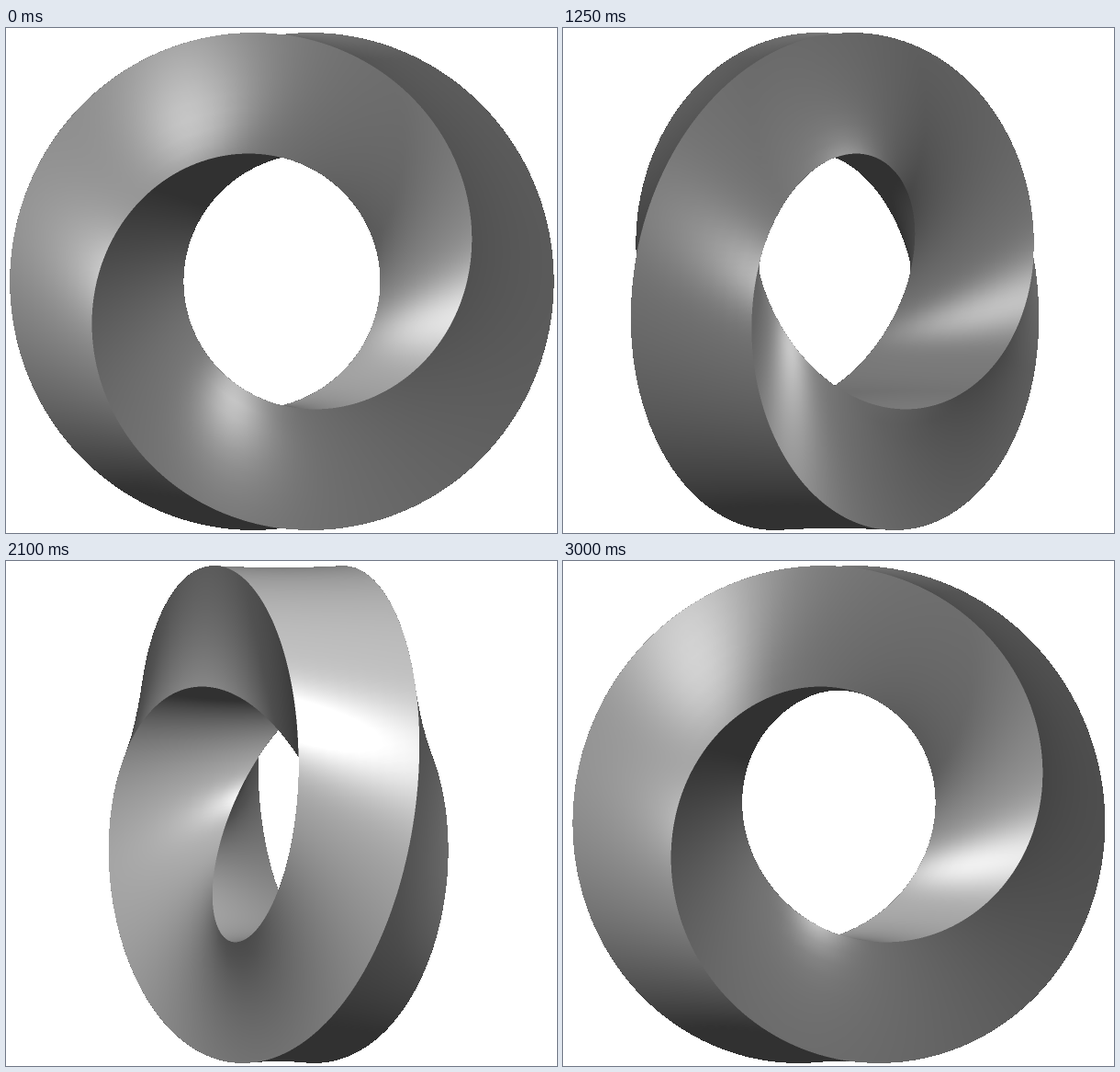
An HTML page with a canvas for the animation above (3050 ms loop, 600 by 549 pixels).

```html
<!DOCTYPE html>
<html lang="en">
<head>
<meta charset="utf-8">
<title>Twisted square ring</title>
<style>
  html, body { margin: 0; width: 100%; height: 100%; overflow: hidden; background: #fff; }
  canvas { display: block; width: 600px; height: 549px; }
</style>
</head>
<body>
<canvas id="stage" width="600" height="549"></canvas>
<script>
const W = 600, H = 549, SS = 2, BW = W * SS, BH = H * SS;
const STEP = 50, COUNT = 61;
const RING = 201.6, HALF = 67.1;          // ring radius, half side of the square section
const AROUND = 180, ACROSS = 8;
const AMBIENT = 49, DIFFUSE = 74, GLOSS = 74, SHININESS = 14;
const RAD = Math.PI / 180;

const ctx = document.getElementById('stage').getContext('2d');
const image = ctx.createImageData(W, H);
const pixels = new Uint32Array(image.data.buffer);
const depth = new Float32Array(BW * BH);
const shade = new Float32Array(BW * BH);

function lightAt(azimuth) {
  const flat = Math.cos(27 * RAD);
  return [flat * Math.cos(azimuth * RAD), Math.sin(27 * RAD), flat * Math.sin(azimuth * RAD)];
}
const cameraLight = lightAt(100);         // stays with the viewer
const ringLight = lightAt(190);           // turns with the ring

const dot = (a, b) => a[0] * b[0] + a[1] * b[1] + a[2] * b[2];
const turn = ([x, y, z], c, s) => [x * c + z * s, y, z * c - x * s];

const vertices = [], triangles = [];

function addVertex(theta, face, u) {
  const gamma = Math.PI / 4 - theta / 2 + face * Math.PI / 2;
  const cg = Math.cos(gamma), sg = Math.sin(gamma);
  const ct = Math.cos(theta), st = Math.sin(theta);
  const r = RING + HALF * cg - u * sg;
  const tilt = u / 2 / r;
  const size = Math.hypot(1, tilt);
  const normal = [(cg * ct + tilt * st) / size, (cg * st - tilt * ct) / size, sg / size];
  vertices.push({ pos: [r * ct, r * st, HALF * sg + u * cg], normal, sx: 0, sy: 0, sz: 0, tone: 0 });
}

for (let face = 0; face < 4; face++) {
  const start = vertices.length, row = ACROSS + 1;
  for (let i = 0; i <= AROUND; i++) {
    for (let j = 0; j <= ACROSS; j++) {
      addVertex(i / AROUND * 2 * Math.PI, face, HALF * (2 * j / ACROSS - 1));
    }
  }
  for (let i = 0; i < AROUND; i++) {
    for (let j = 0; j < ACROSS; j++) {
      const a = start + i * row + j, b = a + row;
      triangles.push([a, b, a + 1], [b, b + 1, a + 1]);
    }
  }
}

// Diffuse and mirror light on a surface seen along the z axis
function lit(normal, light) {
  const facing = dot(normal, light);
  if (facing <= 0) return 0;
  const mirror = Math.max(0, 2 * facing * normal[2] - light[2]);
  return DIFFUSE * facing + GLOSS * Math.pow(mirror, SHININESS);
}

function project(angle) {
  const c = Math.cos(angle), s = Math.sin(angle);
  const cx = 297.9 + 2.5 * c, cy = 275.5;
  const turnedLight = turn(ringLight, c, s);
  for (const v of vertices) {
    const [x, y, z] = turn(v.pos, c, s);
    const normal = turn(v.normal, c, s);
    v.sx = (cx + x) * SS;
    v.sy = (cy - y) * SS;
    v.sz = z;
    v.tone = AMBIENT + lit(normal, cameraLight) + lit(normal, turnedLight);
  }
}

function fillTriangle(a, b, c) {
  const area = (b.sx - a.sx) * (c.sy - a.sy) - (b.sy - a.sy) * (c.sx - a.sx);
  if (Math.abs(area) < 1e-6) return;
  const x0 = Math.max(0, Math.floor(Math.min(a.sx, b.sx, c.sx)));
  const x1 = Math.min(BW - 1, Math.ceil(Math.max(a.sx, b.sx, c.sx)));
  const y0 = Math.max(0, Math.floor(Math.min(a.sy, b.sy, c.sy)));
  const y1 = Math.min(BH - 1, Math.ceil(Math.max(a.sy, b.sy, c.sy)));
  // Barycentric weights of b and c, stepped along each row
  const pbx = (c.sy - a.sy) / area, pby = (a.sx - c.sx) / area;
  const pcx = (a.sy - b.sy) / area, pcy = (b.sx - a.sx) / area;
  const zb = b.sz - a.sz, zc = c.sz - a.sz, tb = b.tone - a.tone, tc = c.tone - a.tone;
  const eps = -1e-5;
  for (let y = y0; y <= y1; y++) {
    const dx = x0 + 0.5 - a.sx, dy = y + 0.5 - a.sy;
    let wb = dx * pbx + dy * pby, wc = dx * pcx + dy * pcy;
    for (let x = x0, at = y * BW + x0; x <= x1; x++, at++, wb += pbx, wc += pcx) {
      if (wb < eps || wc < eps || wb + wc > 1 - eps) continue;
      const z = a.sz + wb * zb + wc * zc;
      if (z > depth[at]) {
        depth[at] = z;
        shade[at] = Math.min(255, a.tone + wb * tb + wc * tc);
      }
    }
  }
}

// Inner edges are smoothed; the outline stays hard
function resolve() {
  for (let y = 0, out = 0; y < H; y++) {
    for (let x = 0; x < W; x++, out++) {
      const i = y * SS * BW + x * SS;
      const p = shade[i], q = shade[i + 1], r = shade[i + BW], s = shade[i + BW + 1];
      const covered = (p > 0) + (q > 0) + (r > 0) + (s > 0);
      const g = covered < 3 ? 255 : Math.round((p + q + r + s) / 4);
      pixels[out] = (0xff000000 | g << 16 | g << 8 | g) >>> 0;
    }
  }
  ctx.putImageData(image, 0, 0);
}

function render(index) {
  depth.fill(-1e4);
  shade.fill(0);
  project((index ? 372 - 6 * index : 0) * RAD);
  for (const [a, b, c] of triangles) fillTriangle(vertices[a], vertices[b], vertices[c]);
  resolve();
}

let shown = -1;
const begin = performance.now();
function tick() {
  const index = Math.floor((performance.now() - begin) / STEP) % COUNT;
  if (index !== shown) render(shown = index);
  requestAnimationFrame(tick);
}
tick();
</script>
</body>
</html>
```
